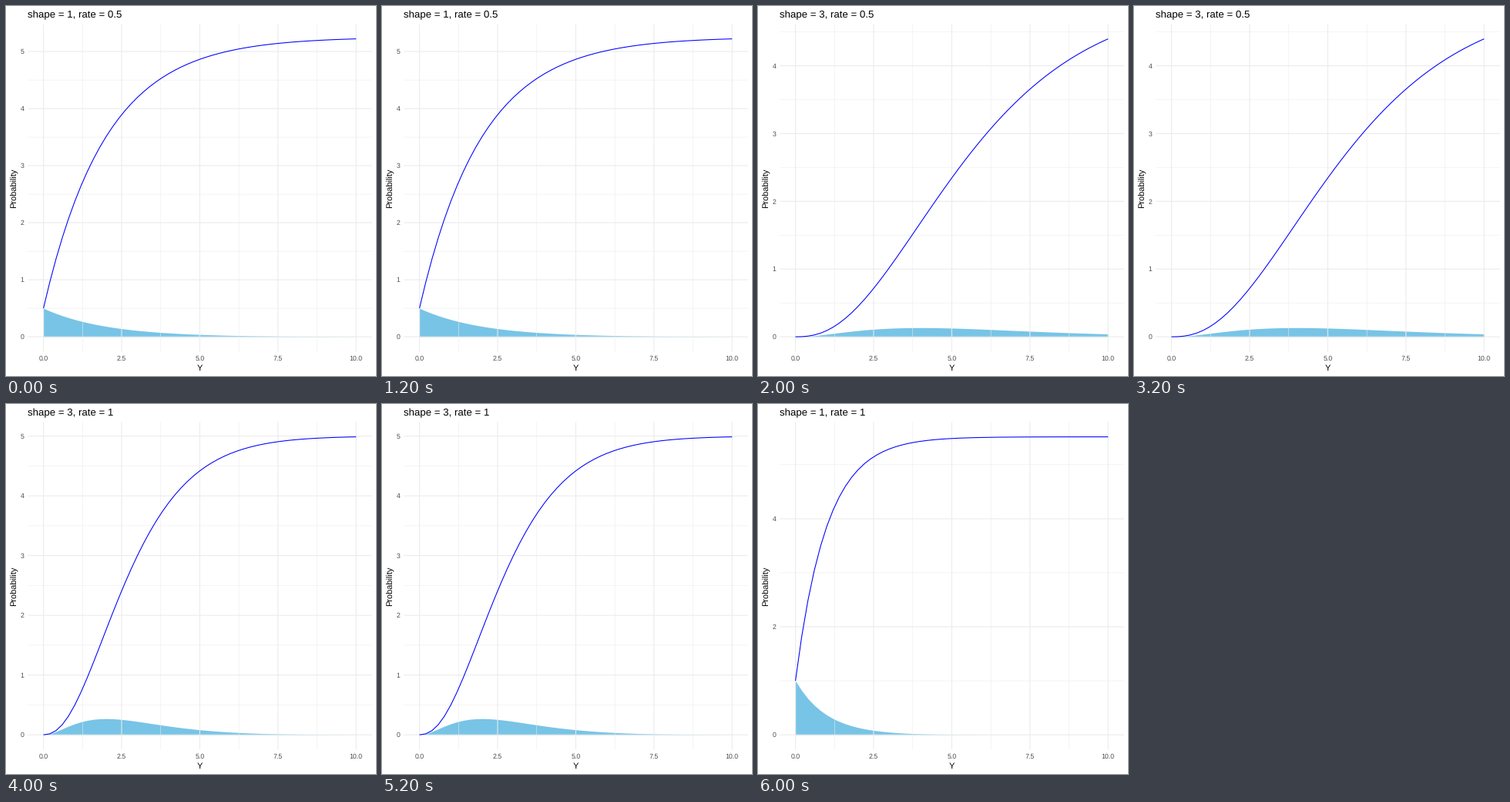
Animation, 480 px wide and 480 px high, one loop 8 s. Source, as a matplotlib script:

```python
import math

import matplotlib.pyplot as plt
import numpy as np
from matplotlib.animation import FuncAnimation

SIZE, DPI = 480, 100
PX = 72 / DPI  # points per pixel
LEFT, RIGHT, TOP, BOTTOM = 28.3, 474.5, 23.3, 448.5
GRID, FILL, LABEL = "#EBEBEB", "#78C4E6", "#4D4D4D"

# shape, rate, distance between labelled values on the y axis
CASES = [(1, 0.5, 1), (3, 0.5, 1), (3, 1, 1), (1, 1, 2)]
Y = np.linspace(0, 10, 51)

plt.rcParams["font.family"] = "Liberation Sans"
plt.rcParams["text.hinting"] = "none"

fig = plt.figure(figsize=(SIZE / DPI, SIZE / DPI), dpi=DPI, facecolor="white")
ax = fig.add_axes([0, 0, 1, 1])


def gamma_density(y, shape, rate):
    return rate**shape / math.gamma(shape) * y ** (shape - 1) * np.exp(-rate * y)


def scale(start, end, top):
    """Map 0..top onto start..end with 5% padding on both sides."""
    span = (end - start) / 1.1
    return lambda v: start + span * (0.05 + np.asarray(v) / top)


def text(x, y, s, size, color="black", ha="center", **kw):
    ax.text(x, y, s, fontsize=size * PX, color=color, ha=ha, va="baseline", **kw)


def line(x, y, color, width, **kw):
    ax.plot(x, y, color=color, lw=width * PX, snap=False,
            solid_capstyle="butt", **kw)


def grid(xs, ys, width):
    for x in xs:
        line([x, x], [TOP, BOTTOM], GRID, width)
    for y in ys:
        line([LEFT, RIGHT], [y, y], GRID, width)


def draw(i):
    shape, rate, step = CASES[i]
    density = gamma_density(Y, shape, rate)
    total = np.cumsum(density)
    top = total[-1]
    to_x, to_y = scale(LEFT, RIGHT, 10), scale(BOTTOM, TOP, top)

    ax.clear()
    ax.set(xlim=(0, SIZE), ylim=(SIZE, 0))
    ax.axis("off")

    x_ticks = np.arange(0, 10.1, 2.5)
    y_ticks = np.arange(0, top * 1.05, step)
    y_minor = np.arange(step / 2, top * 1.05, step)
    grid(to_x(x_ticks[:-1] + 1.25), to_y(y_minor), 0.53)
    grid(to_x(x_ticks), to_y(y_ticks), 1.07)

    ax.fill_between(to_x(Y), to_y(0), to_y(density), color=FILL, lw=0, snap=False)
    line(to_x(Y), to_y(total), "blue", 1.07, solid_joinstyle="round")

    for v in x_ticks:
        text(to_x(v), 459.7, f"{v:.1f}", 8.8, LABEL)
    for v in y_ticks:
        text(23.3, to_y(v) + 3.15, f"{v:.0f}", 8.8, LABEL, ha="right")
    text((LEFT + RIGHT) / 2, 472.6, "Y", 11)
    text(13.4, (TOP + BOTTOM) / 2, "Probability", 11,
         rotation=90, rotation_mode="anchor")
    text(LEFT, 15, f"shape = {shape}, rate = {rate}", 13.2, ha="left")
    return ax.get_children()


anim = FuncAnimation(fig, draw, frames=len(CASES), interval=2000,
                     init_func=lambda: draw(0), repeat=True, repeat_delay=0)
plt.show()
```
